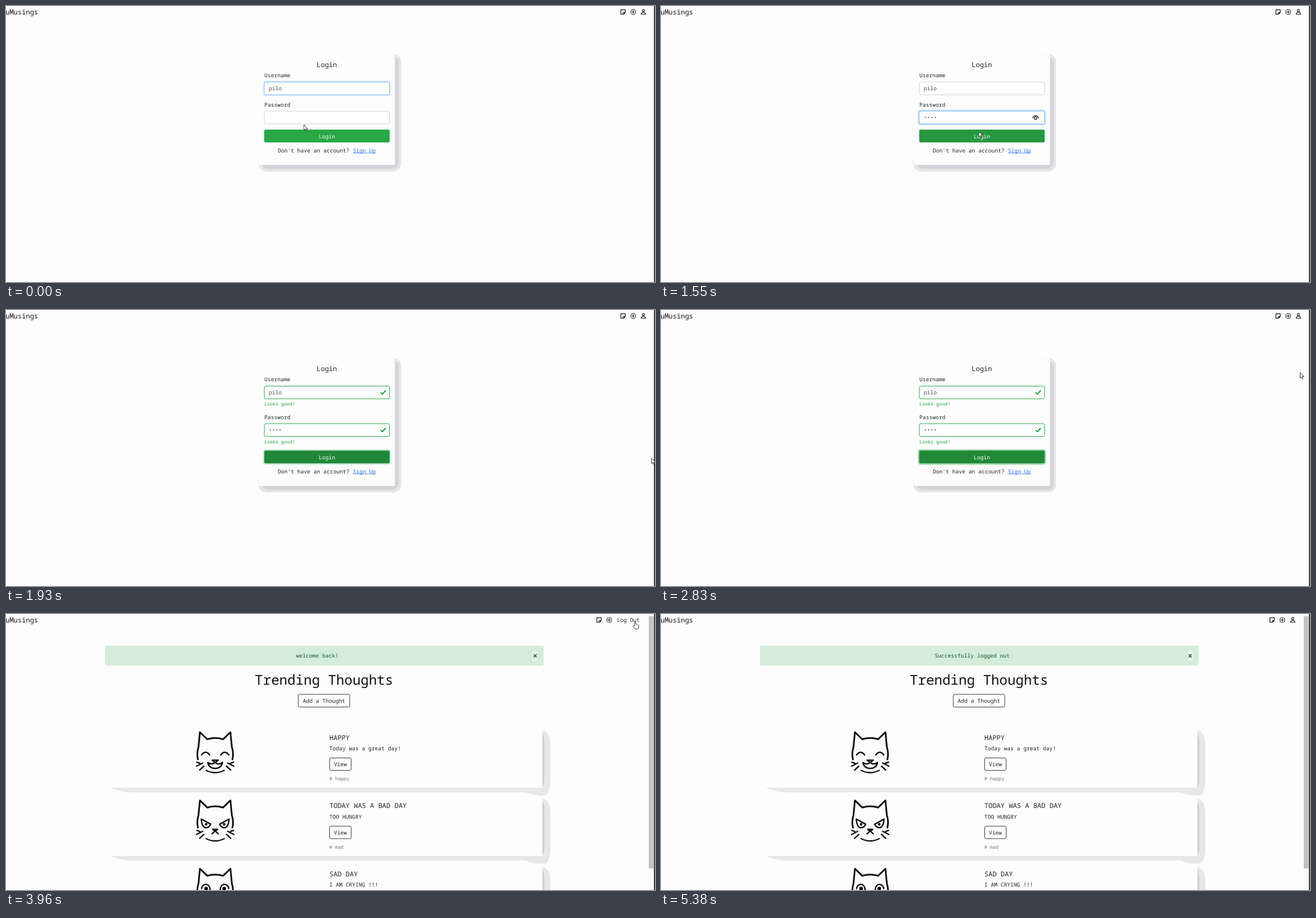
Recreate the animation shown at these times as an HTML page. Size 1148x488 px, loop 5780 ms.

```html
<!DOCTYPE html>
<html lang="en">
<head>
<meta charset="utf-8">
<title>Login and logout</title>
<style>
  html, body { margin: 0; width: 100%; height: 100%; overflow: hidden; background: #fdfdfd; }
  svg { display: block; width: 1148px; height: 488px; }
  text { font-family: "Noto Sans Mono", "DejaVu Sans Mono", monospace; text-rendering: geometricPrecision; }
  .line { fill: none; stroke: #111; stroke-linecap: round; stroke-linejoin: round; }
</style>
</head>
<body>
<svg id="stage" viewBox="0 0 1148 488"></svg>
<script>
const LOOP = 5780;
const INK = '#212529', GREEN = '#28a745', DARK_GREEN = '#218838';
const stage = document.getElementById('stage');

// Pointer steps: start time, shape, x, y
const pointer = [
  [0, 'arrow', 527, 210], [140, 'beam', 526.5, 204], [300, 'beam', 524.5, 200.5],
  [1280, 'beam', 534, 204], [1410, 'arrow', 552, 215.5], [1550, 'arrow', 562, 222],
  [1670, 'arrow', 567, 226], [1790, 'arrow', 569.5, 227], [1930, 'arrow', 1142, 262],
  [2060, 'none', 0, 0], [2520, 'arrow', 1141.5, 239.5], [2680, 'arrow', 1132.5, 144.5],
  [2830, 'arrow', 1130.5, 110.5], [3140, 'arrow', 1127, 85], [3270, 'arrow', 1122.5, 61.5],
  [3410, 'arrow', 1116, 34], [3540, 'hand', 1109, 12], [3680, 'hand', 1109, 13],
  [4090, 'arrow', 1122.5, 223.5], [4240, 'arrow', 1133.5, 473.5], [4400, 'none', 0, 0],
  [4960, 'arrow', 1132, 484], [5090, 'arrow', 1130.5, 482.5], [5230, 'arrow', 1122.5, 483],
  [5380, 'none', 0, 0]
];

const shapes = {
  none: '',
  arrow: '<path d="M0 0V9.7L2.2 7.6 3.8 11.2 5.3 10.5 3.8 7.1H6.9Z" fill="#fff" stroke="#222" stroke-width=".9"/>',
  beam: '<path class="line" d="M-2-5.2Q0-5.2 0-4Q0-5.2 2-5.2M0-4V4M-2 5.2Q0 5.2 0 4Q0 5.2 2 5.2"/>',
  hand: `<path d="M3 8V1.6Q3 .4 4 .4T5 1.6V5Q6.6 4.3 7 5.5Q8.4 5 8.7 6.2Q10 6 10 7.3V10
    Q9.8 12 8.8 13.5H4Q2.6 11 .7 9Q0 8 .8 7.4T3 8.4Z" fill="#fff" stroke="#222" stroke-width=".9"/>`
};

const at = (x, y, body) => `<g transform="translate(${x} ${y})">${body}</g>`;
const text = (x, y, s, size = 9.6, fill = INK, anchor = 'start') =>
  `<text x="${x}" y="${y}" font-size="${size}" fill="${fill}" text-anchor="${anchor}">${s}</text>`;
const mid = (x, y, s, size, fill) => text(x, y, s, size, fill, 'middle');
const rect = (x, y, w, h, fill, r = 0, more = '') =>
  `<rect x="${x}" y="${y}" width="${w}" height="${h}" rx="${r}" fill="${fill}" ${more}/>`;
const line = (d, w = 1, color = '#111') =>
  `<path class="line" d="${d}" style="stroke:${color};stroke-width:${w}"/>`;
const outline = (x, y, w, h, color) => rect(x, y, w, h, 'none', 2.4, `stroke="${color}"`);

const noteIcon = x => at(x, 6, line('M.6.6H8.4V5.6L5.6 8.4H.6Z', 1.2) + '<path d="M5 5H8.6L5 8.8Z" fill="#111"/>');
const plusIcon = x => at(x, 6, outline(.5, .5, 8, 8, '#111') + line('M2.5 4.5H6.5M4.5 2.5V6.5', 1.2));
const userIcon = x => at(x, 6,
  '<circle class="line" cx="4.5" cy="2.4" r="2" stroke-width="1.1"/>' +
  line('M.6 8.8V8Q.8 5.8 3 5.8H6Q8.2 5.8 8.4 8V8.8Z', 1.1));

function field(y, { focus = 0, valid = false } = {}) {
  const halo = focus
    ? rect(455.5, y - 1.5, 224, 25, 'none', 3.5, `stroke="#007bff" stroke-opacity="${focus * .28}" stroke-width="2"`) : '';
  const border = valid ? GREEN : focus ? '#80bdff' : '#ced4da';
  const check = valid ? line(`M663.3 ${y + 11.8}L665.8 ${y + 14.3}L671 ${y + 8.4}`, 2.2, GREEN) : '';
  return halo + rect(457, y, 221.5, 22.5, '#fff', 2.4, `stroke="${border}"`) + check;
}

function loginPage(t) {
  const valid = t >= 1930;
  const grow = valid ? 15 : 0;
  const passY = 186 + grow, buttonY = 219 + 2 * grow, tall = 2 * grow;
  const dots = [450, 580, 730, 860].filter(start => t >= start).length;
  const nameFocus = t < 140 ? .5 : 0;
  const passFocus = t < 140 || valid ? 0 : t >= 450 && t < 1790 ? 1 : .5;
  const button = t < 1550 ? GREEN : t < 1670 ? '#259841' : DARK_GREEN;

  let s = rect(446.5, 85, 252.5, 207.5 + tall, '#e4e5e7', 14)
    + rect(452, 89, 242.5, 199 + tall, '#d3d4d8', 12)
    + rect(446, 84, 242, 197 + tall, '#fdfdfd')
    + line(`M678 85.5H688M446.8 ${270 + tall}V${281 + tall}`, .7, '#e6e6e8')
    + mid(567.5, 107.6, 'Login', 12)
    + text(457, 125.5, 'Username') + field(134.5, { focus: nameFocus, valid })
    + text(464.7, 149, 'pilo', 9.6, '#495057')
    + text(457, 177.5 + grow, 'Password') + field(passY, { focus: passFocus, valid });

  for (let i = 0; i < dots; i++)
    s += `<circle cx="${467.6 + i * 5.76}" cy="${passY + 11}" r="1" fill="#333"/>`;
  if (t >= 300 && t < 1280)
    s += rect(464.5 + dots * 5.76, 191, .9, 12, '#222');
  if (t >= 450 && t < 1790)
    s += line('M657.2 198.2Q658.5 193.8 662.6 193.8T668 198.2', 1.2)
      + '<circle class="line" cx="662.6" cy="198.3" r="2.4" stroke-width="1.2"/>';
  if (valid) {
    s += text(457, 169, 'Looks good!', 8.3, GREEN) + text(457, 236, 'Looks good!', 8.3, GREEN)
      + rect(455.5, 247.5, 224, 25, 'none', 3.5,
        `stroke="${GREEN}" stroke-opacity="${t < 2060 ? .25 : .5}" stroke-width="2"`);
  }
  s += rect(456.7, buttonY - .5, 222, 22.7, button, 2.4)
    + mid(567.6, buttonY + 14.5, 'Login', 9.6, '#fff')
    + text(480.8, buttonY + 39.5, 'Don\'t have an account?')
    + text(613.8, buttonY + 39.5, 'Sign Up', 9.6, '#2f73f5')
    + line(`M614 ${buttonY + 41}H654.3`, .8, '#2f73f5');
  return s + noteIcon(1087) + plusIcon(1105) + userIcon(1123);
}

// Face details share one head; eyes and mouth set the mood
const moods = {
  happy: line('M346 249Q353 240 360 249M380 249Q387 240 394 249', 2.6)
    + line('M364.5 258.5H375.5L370 262.5ZM357 262.5Q364 267.5 370 262.5Q376 267.5 383 262.5Q381 273 370 273T357 262.5Z', 2.4),
  mad: line('M345.5 242L362 251Q359 258 352 257Q346 254 345.5 242ZM394.5 242L378 251Q381 258 388 257Q394 254 394.5 242Z', 2.5)
    + '<circle cx="354" cy="251" r="2.3"/><circle cx="386" cy="251" r="2.3"/>'
    + line('M365.5 260H374.5L370 263.5ZM370 263L364.5 268M370 263L375.5 268', 2.4),
  sad: line('M346 244Q347 237 354 236.5Q361 238 361 247M394 244Q393 237 386 236.5Q379 238 379 247', 2.5)
    + '<circle cx="354" cy="244" r="3.2"/><circle cx="386" cy="244" r="3.2"/>'
};

const head = line('M339.5 257Q337 246 340.5 235L343 209L356 221.5Q370 217 384 221.5L397 209L399.5 235Q403 246 400.5 257', 3)
  + line('M354 276.5Q370 284.5 386 276.5M337 269L348 263.5M342.5 276L350 269M403 269L392 263.5M397.5 276L390 269M337.5 262L343 264M402.5 262L397 264', 2.4);

const post = (dy, mood, title, body) => at(0, dy,
  '<path d="M185 307.3Q200 314 220 315.3H918L930 319Q948 322 956 320Q962 312 963 298V230Q962 208 949 206V307.3Z" fill="#e7e7e9"/>'
  + '<path d="M949 211Q952 216 953.5 228V290Q952 302 949 306Z" fill="url(#edge)"/>'
  + head + moods[mood]
  + text(572, 222.7, title, 12) + text(572, 241, body)
  + outline(572.5, 254.5, 38, 22, '#343a40') + mid(591.5, 269, 'View')
  + text(572, 294, '# ' + mood, 8.4, '#6c757d'));

function feedPage(t) {
  const out = t >= 4550;
  const nav = out
    ? noteIcon(1076.5) + plusIcon(1094.5) + userIcon(1113)
    : noteIcon(1044.5) + plusIcon(1062.5) + text(1080.8, 14, 'Log Out');
  return '<linearGradient id="edge"><stop stop-color="#c6c6c9"/><stop offset="1" stop-color="#e2e2e4"/></linearGradient>'
    + nav
    + rect(175, 56, 776, 35, '#d4edda', 2.4)
    + mid(550.5, 77.3, out ? 'Successfully logged out' : 'welcome back!', 9.6, '#155724')
    + rect(931.5, 65, 9, 18, '#eaf3ec') + line('M933.7 71.7L938.3 76.3M938.3 71.7L933.7 76.3', 1.7, '#555')
    + mid(562.5, 124.5, 'Trending Thoughts', 24, '#111')
    + outline(517, 142, 91, 22.5, '#343a40') + mid(562.5, 156.8, 'Add a Thought')
    + post(0, 'happy', 'HAPPY', 'Today was a great day!')
    + post(120.7, 'mad', 'TODAY WAS A BAD DAY', 'TOO HUNGRY')
    + post(241.4, 'sad', 'SAD DAY', 'I AM CRYING !!!')
    + rect(1137, 3, 9, 485, '#f8f8f8') + rect(1137, 4, 8.5, 446, '#c1c2c3');
}

function scene(t) {
  const [, shape, x, y] = pointer.filter(step => t >= step[0]).pop();
  return (t < 2990 ? loginPage(t) : feedPage(t))
    + text(-.8, 15, 'uMusings', 12, '#111')
    + rect(1146, 0, 2, 488, '#3c424c')
    + at(x, y, shapes[shape]);
}

let shown = '';
function draw() {
  const next = scene(performance.now() % LOOP);
  if (next !== shown) stage.innerHTML = shown = next;
  requestAnimationFrame(draw);
}
draw();
</script>
</body>
</html>
```
